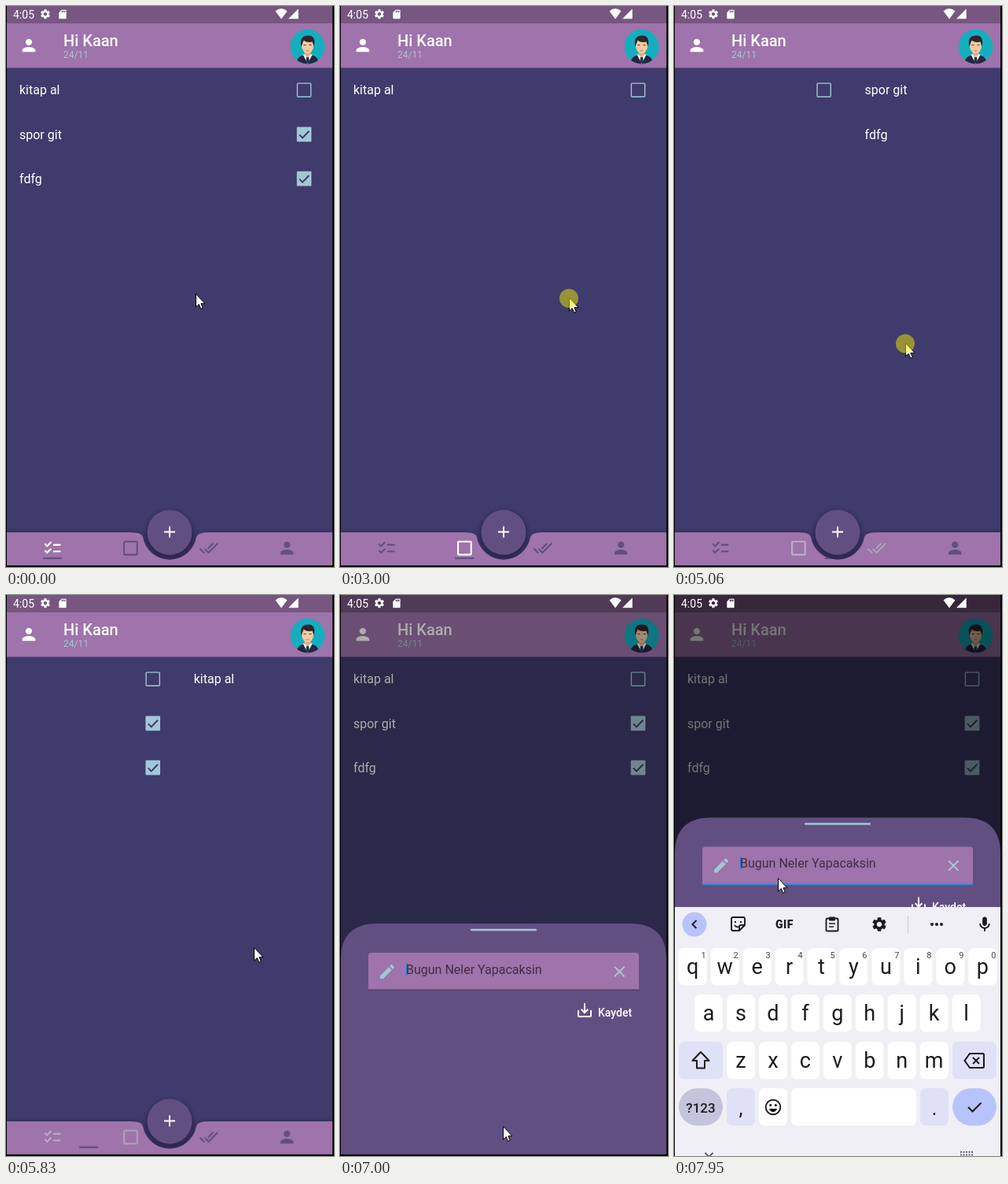
Recreate the animation shown at these times as an HTML page. Size 417 by 712 pixels, loop 8 s.

```html
<!DOCTYPE html>
<html lang="tr">
<head>
<meta charset="utf-8">
<title>To-do app</title>
<style>
html, body { margin: 0; width: 100%; height: 100%; overflow: hidden; background: #000; }
svg { display: block; width: 100vw; height: 100vh; font-family: Roboto, sans-serif; }
</style>
</head>
<body>
<svg id="stage" viewBox="0 0 417 712"></svg>
<script>
const LOOP = 8000, PAGE = 414;
const C = { bg: '#3f3b6c', deep: '#624f82', bar: '#9f73ab', pale: '#a3c7d6', ink: '#1c1b20', key: '#dfe1f7', accent: '#b7c4fb' };

const ICON = {
  person: 'M12 12c2.21 0 4-1.79 4-4s-1.79-4-4-4-4 1.79-4 4 1.79 4 4 4zm0 2c-2.67 0-8 1.34-8 4v2h16v-2c0-2.66-5.33-4-8-4z',
  list: 'M22 7h-9v2h9zm0 8h-9v2h9zM5.54 11 2 7.46l1.41-1.41 2.12 2.12 4.24-4.24 1.41 1.41zm0 8L2 15.46l1.41-1.41 2.12 2.12 4.24-4.24 1.41 1.41z',
  box: 'M19 5v14H5V5h14m0-2H5c-1.1 0-2 .9-2 2v14c0 1.1.9 2 2 2h14c1.1 0 2-.9 2-2V5c0-1.1-.9-2-2-2z',
  doneAll: 'm18 7-1.41-1.41-6.34 6.34 1.41 1.41zm4.24-1.41L11.66 16.17 7.48 12l-1.41 1.41L11.66 19l12-12zM.41 13.41 6 19l1.41-1.41L1.83 12z',
  gear: 'M19.14 12.94c.04-.3.06-.61.06-.94 0-.32-.02-.64-.07-.94l2.03-1.58c.18-.14.23-.41.12-.61l-1.92-3.32c-.12-.22-.37-.29-.59-.22l-2.39.96c-.5-.38-1.03-.7-1.62-.94l-.36-2.54c-.04-.24-.24-.41-.48-.41h-3.84c-.24 0-.43.17-.47.41l-.36 2.54c-.59.24-1.13.57-1.62.94l-2.39-.96c-.22-.08-.47 0-.59.22L2.74 8.87c-.12.21-.08.47.12.61l2.03 1.58c-.05.3-.09.63-.09.94s.02.64.07.94l-2.03 1.58c-.18.14-.23.41-.12.61l1.92 3.32c.12.22.37.29.59.22l2.39-.96c.5.38 1.03.7 1.62.94l.36 2.54c.05.24.24.41.48.41h3.84c.24 0 .44-.17.47-.41l.36-2.54c.59-.24 1.13-.56 1.62-.94l2.39.96c.22.08.47 0 .59-.22l1.92-3.32c.12-.22.07-.47-.12-.61zM12 15.6c-1.98 0-3.6-1.62-3.6-3.6s1.62-3.6 3.6-3.6 3.6 1.62 3.6 3.6-1.62 3.6-3.6 3.6z',
  card: 'M18 2h-8L4.02 8 4 20c0 1.1.9 2 2 2h12c1.1 0 2-.9 2-2V4c0-1.1-.9-2-2-2zm-6 6h-2V4h2zm3 0h-2V4h2zm3 0h-2V4h2z',
  edit: 'M3 17.25V21h3.75L17.81 9.94l-3.75-3.75zM20.71 7.04c.39-.39.39-1.02 0-1.41l-2.34-2.34c-.39-.39-1.02-.39-1.41 0l-1.83 1.83 3.75 3.75z',
  close: 'M19 6.41 17.59 5 12 10.59 6.41 5 5 6.41 10.59 12 5 17.59 6.41 19 12 13.41 17.59 19 19 17.59 13.41 12z',
  save: 'M19 12v7H5v-7H3v7c0 1.1.9 2 2 2h14c1.1 0 2-.9 2-2v-7zm-6 .67 2.59-2.58L17 11.5l-5 5-5-5 1.41-1.41L11 12.67V3h2z',
  mic: 'M12 14c1.66 0 3-1.34 3-3V5c0-1.66-1.34-3-3-3S9 3.34 9 5v6c0 1.66 1.34 3 3 3zm5-3c0 2.76-2.24 5-5 5s-5-2.24-5-5H5c0 3.53 2.61 6.43 6 6.92V21h2v-3.08c3.39-.49 6-3.39 6-6.92z'
};

const icon = (name, x, y, size, fill, id = '') =>
  `<path ${id && `id="${id}"`} d="${ICON[name]}" fill="${fill}" transform="translate(${x - size / 2} ${y - size / 2}) scale(${size / 24})"/>`;
const rect = (x, y, w, h, fill, r = 0, more = '') =>
  `<rect x="${x}" y="${y}" width="${w}" height="${h}" rx="${r}" fill="${fill}" ${more}/>`;
const text = (s, x, y, size, fill, more = '') =>
  `<text x="${x}" y="${y}" font-size="${size}" fill="${fill}" ${more}>${s}</text>`;
const line = (d, color, w = 2, more = '') =>
  `<path d="${d}" fill="none" stroke="${color}" stroke-width="${w}" ${more}/>`;
const MID = 'text-anchor="middle"';

function task([label, done], row) {
  const y = 106.7 + row * 56.2;
  const box = done
    ? rect(369.7, y - 9.3, 18.6, 18.6, C.pale, 1) + line(`M373 ${y + .5}l4 4 8.3-8.6`, C.bg, 2)
    : rect(370.4, y - 8.6, 17.2, 17.2, 'none', 1, `stroke="${C.pale}" stroke-width="1.4"`);
  return text(label, 17, y + 5.6, 16, '#fff') + box;
}

const tasks = [['kitap al', false], ['spor git', true], ['fdfg', true]];
const pages = [tasks, tasks.filter(t => !t[1]), tasks.filter(t => t[1])];

function avatar() {
  return `<g transform="translate(383.5 51.5)" clip-path="url(#face)">
    <circle r="22" fill="#13afc0"/>
    <path d="M-14 23c0-9 4-11 9-12h10c5 1 9 3 9 12z" fill="#20283f"/>
    <path d="M-6 10 0 22 6 10z" fill="#fff"/><path d="M-1.5 13h3l1 8h-5z" fill="#26314d"/>
    <path d="M-4 4h8v6L0 14l-4-4z" fill="#e5ae82"/>
    <ellipse cy="-1" rx="7.5" ry="9.5" fill="#f7c9a0"/>
    <path d="M-8 0c-2-8 0-14 9-14 7 0 9 6 7 14l-2-6c-5 1-9 0-11-2z" fill="#31242a"/>
    ${line('M-5 -2h3M2 -2h3', '#49343a', 1)}${line('M-2 5q2 1 4 0', '#b96f5b', 1)}
  </g>`;
}

const statusBar = text('4:05', 9, 15.7, 14, '#fff') + icon('gear', 50, 10.3, 15, '#fff') +
  icon('card', 72, 10.5, 14, '#fff') +
  `<path d="M350 16.5 342.5 6.5Q350 0 357.5 6.5zM359 16.3H371.7V3.5z" fill="#fff"/>`;

const header = rect(1, 0, 414, 78.5, C.bar) + rect(1, 0, 414, 22, '#000', 0, 'opacity=".25"') +
  icon('person', 29, 50, 25, '#fff') + text('Hi Kaan', 73, 51, 20, '#fff', 'font-weight="500"') +
  text('24/11', 73, 66, 12, C.pale) + avatar();

const tabIcons = ['list', 'box', 'doneAll', 'person'];
const tabX = i => 59 + i * 99.4;
const barShape = 'M1 668H158Q172.5 668 174 674A34.5 34.5 0 0 0 242 674Q243.5 668 258 668H415V710H1Z';

const nav = `<circle cx="208" cy="671" r="31" fill="#28234b" opacity=".75" filter="url(#soft)"/>` +
  `<path d="${barShape}" fill="#221d42" opacity=".5" filter="url(#soft)" transform="translate(0 -.5)" clip-path="url(#body)"/>` +
  `<path d="${barShape}" fill="${C.bar}"/>` +
  `<g clip-path="url(#bar)">${tabIcons.map((n, i) => icon(n, tabX(i), 688, 25, C.deep, 'tab' + i)).join('')}` +
  rect(-12, 699.8, 24, 2.2, C.deep, 0, 'id="mark"') + '</g>' +
  `<circle cx="208" cy="668" r="28.5" fill="${C.deep}"/>` + line('M201 667.5h14m-7-7v14', '#fff', 2);

// Sheet coordinates are relative to its top edge.
const sheet = `<path d="M1 430V46Q1 0 47 0H369Q415 0 415 46V430Z" fill="${C.deep}"/>` +
  rect(166, 6.8, 84, 2.5, C.pale, 1) +
  `<path d="M36 84.5V41Q36 37 40 37H376Q380 37 380 41V84.5Z" fill="${C.bar}"/>` +
  rect(36, 83.5, 344, 1.2, '#4b3652', 0, 'id="under"') +
  icon('edit', 60, 61, 24, C.pale) + icon('close', 355.3, 61, 24, C.pale) +
  rect(84, 50, 2.2, 16, '#2f7fd0', 1, 'id="caret"') +
  text('Bugun Neler Yapacaksin', 84, 63.5, 16, '#000', 'opacity=".6"') +
  icon('save', 311, 110, 24, '#fff') + text('Kaydet', 328, 118, 14, '#fff', 'font-weight="500"');

function keyRow(letters, x0, y, digits) {
  return [...letters].map((ch, i) => {
    const x = x0 + i * 40.95;
    return rect(x - 18, y, 36, 47.3, '#fff', 7) + text(ch, x, y + 33, 27, C.ink, MID) +
      (digits ? text((i + 1) % 10, x + 14, y + 13, 11, '#46454c', MID) : '');
  }).join('');
}

const keyboard = rect(1, 396, 414, 330, '#f1eff6') +
  `<circle cx="26" cy="418" r="15.5" fill="${C.accent}"/>` + line('M28.5 413l-5 5 5 5', C.ink) +
  line('M90 419v-8q0-2-2-2H75q-2 0-2 2v13q0 2 2 2h8zh-5q-2 0-2 2v5', C.ink, 1.9) +
  line('M77 415h2m5 0h2M77 419q2 3 5 2', C.ink, 1.8) +
  text('GIF', 140.5, 423, 14, C.ink, MID + ' font-weight="900" letter-spacing=".5"') +
  rect(193.5, 410.5, 15, 16, 'none', 1.5, `stroke="${C.ink}" stroke-width="1.9"`) +
  rect(197, 408.5, 8, 5, C.ink, 1) + line('M197 417h8m-8 4h6', C.ink, 1.6) +
  icon('gear', 261, 418, 22, C.ink) + rect(297, 407, 1, 22, '#c7c5ce') +
  [-6, 0, 6].map(d => `<circle cx="${334 + d}" cy="418" r="2" fill="${C.ink}"/>`).join('') +
  icon('mic', 395, 418, 23, C.ink) +
  keyRow('qwertyuiop', 23.7, 448, true) + keyRow('asdfghjkl', 44, 507) + keyRow('zxcvbnm', 85, 567) +
  rect(6, 567, 56, 47.3, C.key, 7) + line('M34 580l10.5 11h-5.5v9.500h-10v-9.500h-5.5z', C.ink, 2, 'stroke-linejoin="round"') +
  rect(354, 567, 56, 47.3, C.key, 7) + line('M376 582h16.500q1.500 0 1.500 1.500v15q0 1.500-1.500 1.500h-16.500l-6.500-9zM380 587l8 8m0-8l-8 8', C.ink) +
  rect(6, 626, 56, 47.5, '#c4c5dd', 23.7) + text('?123', 34, 656.5, 17, C.ink, MID + ' font-weight="500"') +
  rect(67, 626, 36, 47.5, C.key, 7) + text(',', 85, 660, 25, C.ink, MID) +
  rect(108, 626, 36, 47.5, '#fff', 7) + `<circle cx="126" cy="650" r="9.3" fill="none" stroke="${C.ink}" stroke-width="1.9"/>` +
  `<circle cx="122.700" cy="647.500" r="1.500"/><circle cx="129.300" cy="647.500" r="1.500"/><path d="M121 652h10q-1.500 4-5 4t-5-4z"/>` +
  rect(149, 626, 159, 47.5, '#fff', 7) +
  rect(313, 626, 36, 47.5, C.key, 7) + text('.', 331, 660, 25, C.ink, MID) +
  rect(354, 626, 56, 47.5, C.accent, 23.7) + line('M374 650l5.500 5.500 11-11', C.ink, 2.2) +
  line('M39.500 708l5 5 5-5', '#55545b', 1.8) +
  line('M364 707h16m-16 3.500h16', '#66656c', 1.8, 'stroke-dasharray="2 1.500"');

const stage = document.getElementById('stage');
stage.innerHTML = `<defs>
  <clipPath id="face"><circle r="22"/></clipPath>
  <clipPath id="body">${rect(1, 0, 414, 710, '#000')}</clipPath>
  <clipPath id="bar"><path d="${barShape}"/></clipPath>
  <filter id="soft" x="-20%" y="-20%" width="140%" height="140%"><feGaussianBlur stdDeviation="2"/></filter>
  </defs>
  ${rect(0, 0, 417, 712, '#000')}
  <g clip-path="url(#body)">${rect(1, 0, 414, 710, C.bg)}
    ${pages.map((p, i) => `<g id="page${i}">${p.map(task).join('')}</g>`).join('')}
    ${header}${nav}${rect(1, 0, 414, 710, '#000', 0, 'id="scrim"')}${statusBar}
    <g id="sheet">${sheet}</g></g>
  <g id="keys">${keyboard}</g>
  <path id="mouse" d="M.5-.5V16L4.300 12.600 6.700 18.300 9.300 17.200 6.900 11.700H12Z" fill="#fff" stroke="#000"/>
  <circle id="press" r="12" fill="#f1e900" opacity=".5"/>`;

const el = id => document.getElementById(id);
const move = (id, x, y) => el(id).setAttribute('transform', `translate(${x} ${y})`);
const show = (id, on) => el(id).setAttribute('visibility', on ? 'visible' : 'hidden');
const ramp = (t, a, b) => Math.min(1, Math.max(0, (t - a) / (b - a)));
const smooth = u => u * u * (3 - 2 * u);
const easeOut = u => 1 - (1 - u) ** 3;
const mix = (a, b, u) => a + (b - a) * u;

// Mouse stops: time, x, y
const stops = [
  [0, 241, 366], [790, 241, 366], [1190, 278, 352], [1460, 278, 352], [2000, 60, 366], [2260, 62, 367],
  [2740, 291, 371], [3050, 291, 371], [3560, 85, 395], [4090, 100, 403], [4640, 100, 403],
  [5130, 305, 430], [5420, 115, 440], [5830, 315, 448], [6200, 318, 455], [6740, 207, 668],
  [7000, 207, 675], [7130, 207, 675], [7550, 128, 358], [7790, 128, 358], [7950, 132, 360]
];
const presses = [[790, 1950], [3000, 3520], [4640, 5120], [5430, 5800], [6740, 6860]];

function mouseAt(t) {
  const i = stops.findIndex(s => s[0] > t);
  if (i < 0) return stops[stops.length - 1].slice(1);
  const [a, b] = [stops[i - 1], stops[i]], u = smooth(ramp(t, a[0], b[0]));
  return [mix(a[1], b[1], u), mix(a[2], b[2], u)];
}

const pageAt = t => smooth(ramp(t, 1552, 2357)) + smooth(ramp(t, 3084, 3784)) -
  smooth(ramp(t, 4690, 5390)) - smooth(ramp(t, 5412, 6212));

function tint(u) {
  return `rgb(${[98, 79, 130].map(c => Math.round(mix(c, 255, u)))})`;
}

function draw(t) {
  const page = pageAt(t);
  pages.forEach((_, i) => move('page' + i, (i - page) * PAGE, 0));
  tabIcons.forEach((_, i) => el('tab' + i).setAttribute('fill', tint(Math.max(0, 1 - Math.abs(i - page)))));
  move('mark', tabX(page), 0);

  el('scrim').setAttribute('opacity', .54 * ramp(t, 6850, 7100));
  const lift = easeOut(ramp(t, 7080, 7400));
  move('sheet', 0, mix(712, 417, easeOut(ramp(t, 6850, 6995))) - 134.5 * lift);
  show('sheet', t >= 6850);
  move('keys', 0, 316 * (1 - lift));
  show('keys', t >= 7080);

  const focused = t >= 7130, under = el('under');
  under.setAttribute('fill', focused ? '#2f8ce0' : '#4b3652');
  under.setAttribute('height', focused ? 2 : 1.2);
  show('caret', t >= 6900 && (t < 7450 || t >= 7820));

  const [x, y] = mouseAt(t);
  move('mouse', x, y);
  move('press', x, y);
  show('press', presses.some(([a, b]) => t >= a && t < b));
}

function tick() {
  draw(performance.now() % LOOP);
  requestAnimationFrame(tick);
}
tick();
</script>
</body>
</html>
```
